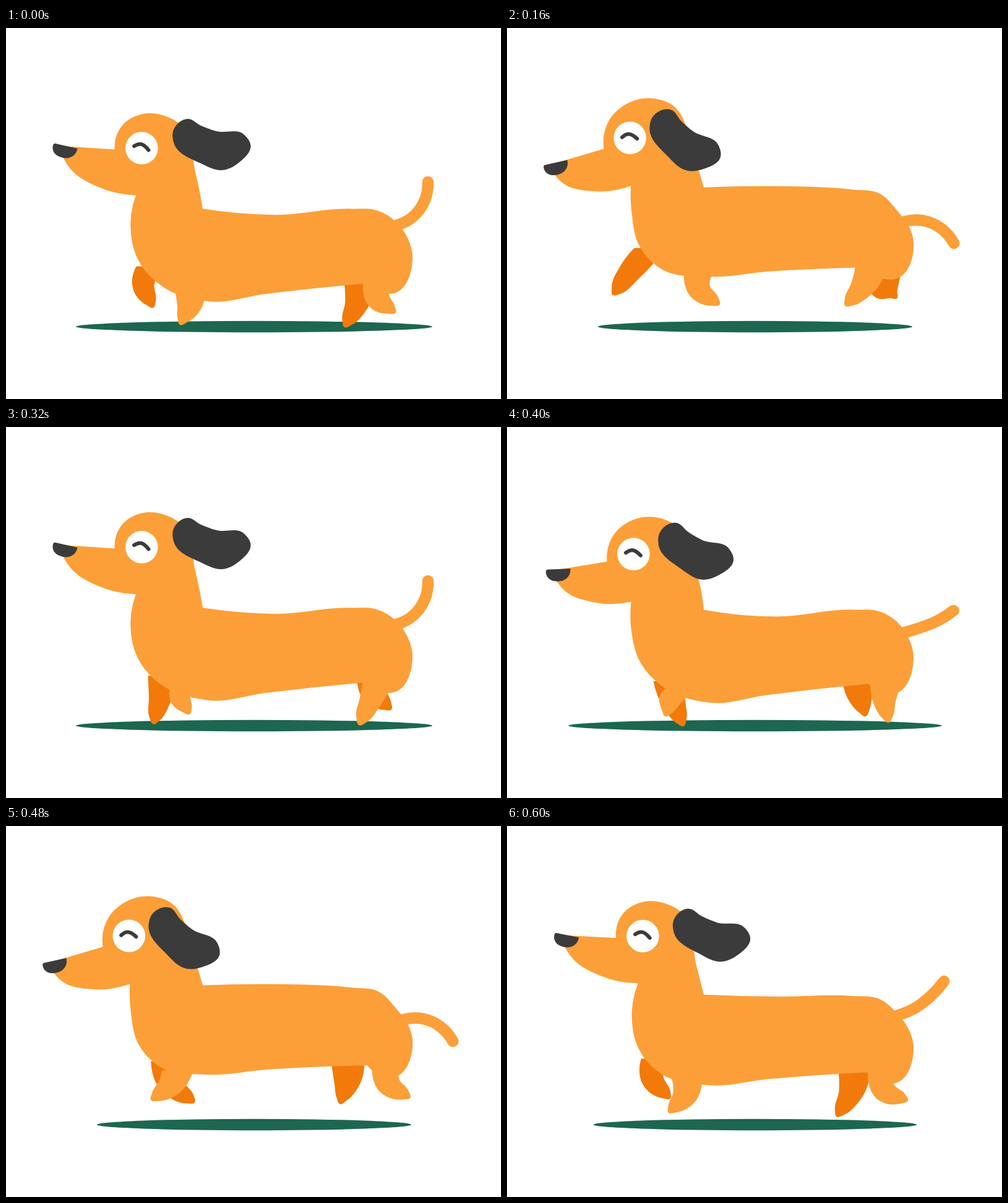
An HTML page with a canvas for the animation above (640 ms loop, 800 px wide and 600 px high).

```html
<!DOCTYPE html>
<html lang="en">
<head>
<meta charset="utf-8">
<title>Running dachshund</title>
<style>
html, body { margin: 0; width: 100%; height: 100%; overflow: hidden; background: #fff; }
canvas { display: block; }
</style>
</head>
<body>
<canvas id="stage" width="800" height="600"></canvas>
<script>
const ctx = document.getElementById('stage').getContext('2d');
const LOOP = 640, STEP = 40, GROUND = 484, RAD = Math.PI / 180;
const ORANGE = '#fc9f38', RUST = '#f27a0b', DARK = '#3b3b3b', GREEN = '#1d6650';

// Waves over one bounce (two per loop) and one stride (one per loop), lag in degrees.
const bounce = (t, lag = 0) => Math.cos(t / LOOP * 4 * Math.PI - lag * RAD);
const stride = (t, lag) => Math.cos(t / LOOP * 2 * Math.PI - lag * RAD);
const ride = t => bounce(t, 50);

// Trunk outline from throat to withers: x, y, share of the bounce.
const TRUNK = [
  [202, 318, 24], [214, 364, 18], [247, 401, 20], [327, 422, 31], [420, 412, 28], [584, 400, 20],
  [625, 418, 18], [657, 359, 20], [647, 326, 15], [632, 306, 14], [600, 281, 22], [560, 277, 24],
  [435, 279, 36], [318, 275, 27]
];
// Throat, chin, muzzle, brow and crown.
const HEAD = [
  [205, 263], [142, 260], [98, 240], [77, 206], [166, 196],
  [175, 156], [207, 131], [248, 129], [270, 138]
];
const EAR = [
  [10, -23], [34, -19], [60, -18], [105, -26], [119, -15], [110, 20], [93, 37], [51, 39], [0, 20], [-6, 6]
];

// Each joint circles around its place: x, reach, lag, y, lift, lag.
const LEGS = {
  frontNear: {
    half: 25,
    hip: [294, 17, 80, 418, 0, 0], knee: [288, 29, 80, 436, 9, 12], foot: [289, 55, 98, 459, 8, 15]
  },
  frontFar: {
    half: 25,
    hip: [245, 17, 236, 391, 15, 236], knee: [236, 40, 252, 420, 18, 234], foot: [238, 67, 270, 453, 16, 208]
  },
  backNear: {
    half: 26,
    hip: [604, 14, 270, 402, 0, 0], knee: [598, 29, 289, 433, 0, 0], foot: [600, 61, 299, 458, 12, 155]
  },
  backFar: {
    half: 27,
    hip: [583, 33, 110, 400, 0, 0], knee: [584, 41, 119, 435, 6, 14], foot: [585, 59, 130, 457, 15, 335]
  }
};

const toward = (p, d, len) => [p[0] + d[0] * len, p[1] + d[1] * len];
const unit = (p, q) => {
  const l = Math.hypot(q[0] - p[0], q[1] - p[1]) || 1;
  return [(q[0] - p[0]) / l, (q[1] - p[1]) / l, l];
};

// Smooth path through points; corners keep a sharp angle.
function trace(pts, corners = [], closed = true) {
  const n = pts.length;
  const pt = i => pts[(i + n) % n];
  const sharp = i => corners.includes(i % n);
  const tangent = i => {
    const a = unit(pt(i - 1), pt(i)), b = unit(pt(i), pt(i + 1));
    return unit([0, 0], [a[0] * b[2] + b[0] * a[2], a[1] * b[2] + b[1] * a[2]]);
  };
  ctx.beginPath();
  ctx.moveTo(...pt(0));
  for (let i = 0; i < (closed ? n : n - 1); i++) {
    const p = pt(i), q = pt(i + 1), len = unit(p, q)[2];
    const out = f => toward(p, tangent(i), len * f);
    const into = f => toward(q, tangent(i + 1), -len * f);
    if (sharp(i) && sharp(i + 1)) ctx.lineTo(...q);
    else if (sharp(i)) ctx.quadraticCurveTo(...into(.5), ...q);
    else if (sharp(i + 1)) ctx.quadraticCurveTo(...out(.5), ...q);
    else ctx.bezierCurveTo(...out(.35), ...into(.35), ...q);
  }
}

function blob(pts, color, corners) {
  trace(pts, corners);
  ctx.fillStyle = color;
  ctx.fill();
}

function line(color, width) {
  ctx.strokeStyle = color;
  ctx.lineWidth = width;
  ctx.lineCap = ctx.lineJoin = 'round';
  ctx.stroke();
}

function placed([x, y], angle, paint) {
  ctx.save();
  ctx.translate(x, y);
  ctx.rotate(angle * RAD);
  paint();
  ctx.restore();
}

// The head nods: it slides, leans and tilts with the bounce.
function nod([x, y], t) {
  const c = bounce(t), s = bounce(t, 90);
  return [
    x + c * (10 + .07 * (190 - y)) - 4.5 * s,
    y + c * .18 * (x - 163) + s * (21 - .05 * (x - 180))
  ];
}

function leg({ hip, knee, foot, half }, t, color) {
  const joint = ([x, reach, lagX, y, lift, lagY], share) =>
    [x + reach * stride(t, lagX), y + lift * stride(t, lagY) + share * ride(t)];
  const h = joint(hip, 20), k = joint(knee, 16), f = joint(foot, 21);
  f[1] = Math.min(f[1], GROUND);
  const d = unit(k, f), side = [-d[1], d[0]], paw = toward(f, d, -8);
  blob([
    [h[0] - half, h[1] - 10], toward(k, side, 18), toward(paw, side, 8), f,
    toward(paw, side, -8), toward(k, side, -18), [h[0] + half, h[1] - 10]
  ], color, [0, 6]);
}

// Three links, each whipping further than the one before.
function tail(t) {
  const pts = [[637 - 6 * bounce(t), 316 + 18 * bounce(t, 80)]];
  for (let i = 0; i < 3; i++) {
    const a = (-15 - (13 + 27 * i) * bounce(t, 5 + 5 * i)) * RAD;
    pts.push(toward(pts[i], [Math.cos(a), Math.sin(a)], 31));
  }
  trace(pts, [0, 3], false);
  line(ORANGE, 18.5);
}

function paintEye() {
  ctx.beginPath();
  ctx.arc(0, 0, 26.3, 0, 7);
  ctx.fillStyle = '#fff';
  ctx.fill();
  ctx.beginPath();
  ctx.moveTo(-12.6, .3);
  ctx.bezierCurveTo(-6, -7.5, 0, -8.5, 11.6, 0);
  line(DARK, 6);
}

function paintNose() {
  ctx.beginPath();
  ctx.moveTo(-20, 3);
  ctx.quadraticCurveTo(-20, -2, -16, -1.5);
  ctx.lineTo(20, 0);
  ctx.bezierCurveTo(20, 11, 12, 19, 0, 19);
  ctx.bezierCurveTo(-12, 19, -20, 13, -20, 3);
  ctx.fillStyle = DARK;
  ctx.fill();
}

function draw(t) {
  ctx.fillStyle = '#fff';
  ctx.fillRect(0, 0, 800, 600);

  ctx.beginPath();
  ctx.ellipse(401, 483, 271 + 35 * bounce(t, 61), 9.2, 0, 0, 7);
  ctx.fillStyle = GREEN;
  ctx.fill();

  const skull = HEAD.map(p => nod(p, t));
  const trunk = TRUNK.map(([x, y, share]) => [x, y + share * ride(t)]);
  const withers = trunk[trunk.length - 1];

  leg(LEGS.frontFar, t, RUST);
  leg(LEGS.backFar, t, RUST);
  tail(t);
  blob([skull[0], ...trunk], ORANGE, [0, 6, 14]);
  leg(LEGS.frontNear, t, ORANGE);
  leg(LEGS.backNear, t, ORANGE);
  const nape = [306, 226 + 10 * ride(t)];
  blob([...skull, nape, withers, [300, 330], [230, 330]], ORANGE, [0, 3, 4, 10, 11, 12]);

  const earRoot = [260 + 17 * bounce(t) - 6 * bounce(t, 90), 155 + 19 * bounce(t, 55)];
  placed(earRoot, 28 - 10.5 * bounce(t), () => blob(EAR, DARK));
  placed(nod([209, 186], t), 11 + 5 * bounce(t), paintEye);
  placed(nod([87, 205], t), -2 + 13 * bounce(t, -13), paintNose);
}

const start = performance.now();
function tick() {
  const t = (performance.now() - start) % LOOP;
  draw(Math.floor(t / STEP) * STEP);
  requestAnimationFrame(tick);
}
tick();
</script>
</body>
</html>
```
